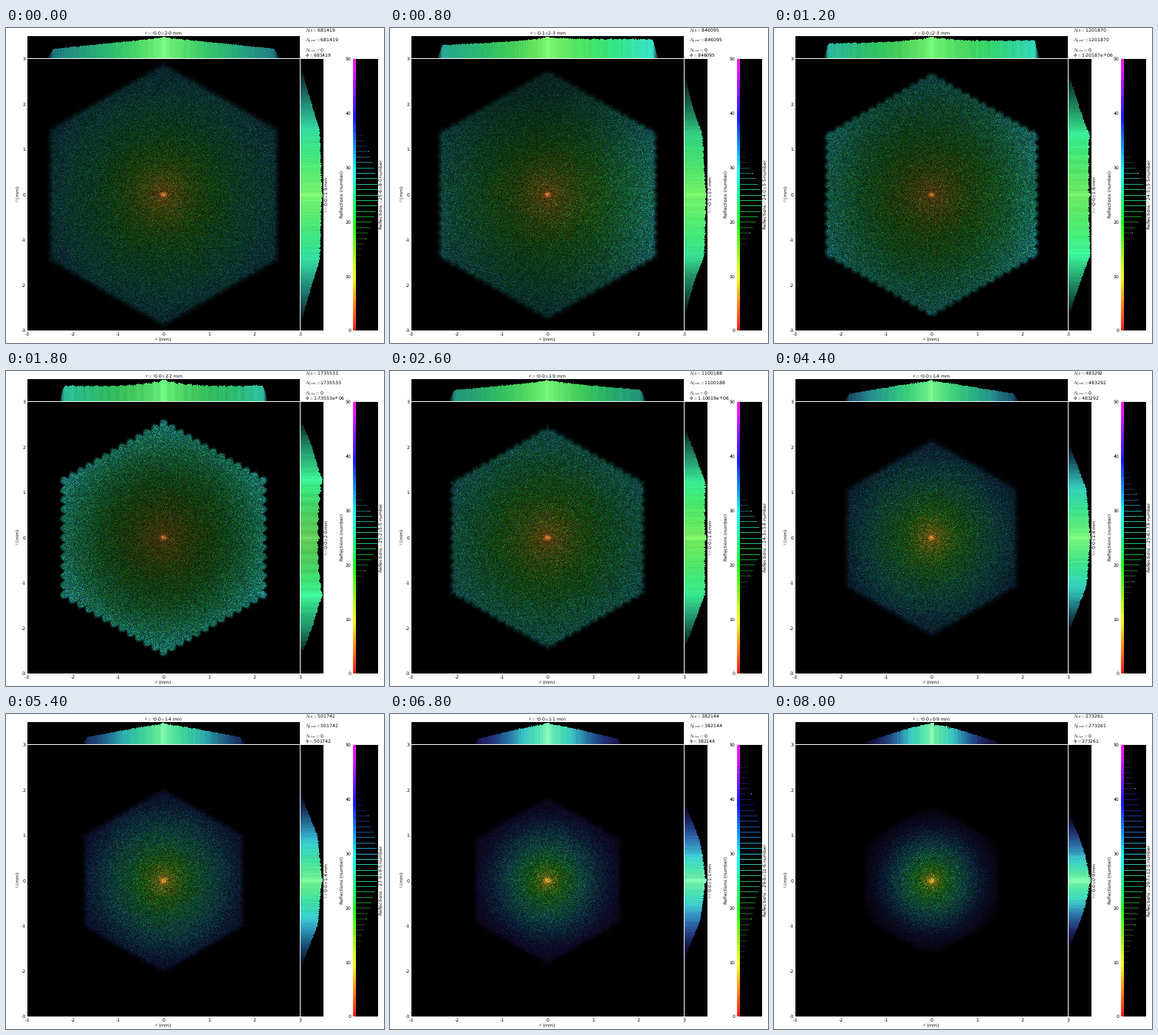
Animation, 512 px wide and 428 px high, one loop 8200 ms. Source, as a matplotlib script:

```python
import numpy as np
import matplotlib.pyplot as plt
from matplotlib.animation import FuncAnimation
from matplotlib.collections import LineCollection
from matplotlib.colors import hsv_to_rgb

W, H, DPI = 512, 428, 64
FRAMES, INTERVAL = 41, 200
SIZE = 369            # main map, pixels per side
STRIP_X, STRIP_Z = 30, 31
MAX_N = 50

plt.rcParams.update({
    'font.family': 'DejaVu Sans',
    'font.size': 6.1 * 72 / DPI,
    'mathtext.fontset': 'cm',
    'axes.unicode_minus': False,
    'text.hinting': 'none',
})

# step: rays, x half width, z half width, mean reflections, their half width
READINGS = {
    0: (681419, 2.0, 1.9, 25.6, 8.0),
    4: (846095, 2.3, 1.7, 24.0, 5.5),
    9: (1735533, 2.2, 2.0, 25.2, 5.5),
    17: (464842, 1.5, 1.3, 23.4, 6.0),
    27: (501742, 1.4, 1.4, 27.9, 9.5),
    34: (382144, 1.1, 1.1, 29.6, 11.6),
    40: (273261, .9, .9, 29.7, 12.5),
}

axis = (np.arange(SIZE) + .5) / SIZE * 6 - 3
X, Z = np.meshgrid(axis, axis)
R = np.hypot(X, Z)
SIDE, SLANT = np.abs(X), .5 * np.abs(X) + .866 * np.abs(Z)
HEX = np.maximum(SIDE, SLANT)
ALONG = np.where(SIDE > SLANT, Z, .866 * np.abs(X) - .5 * np.abs(Z))
SCALLOP = np.abs(np.cos(np.pi * ALONG / .21)) - .5
SPOT = .75 * np.exp(-(X / .058) ** 2 - (Z / .05) ** 2)
HALO = .08 * np.exp(-R / .25)


def pulse(i, centre, width):
    return np.exp(-((i - centre) / width) ** 2)


def readings(i):
    return [np.interp(i, list(READINGS), col) for col in zip(*READINGS.values())]


def colour(n, sat, val):
    hue = .85 * np.clip(n, 0, MAX_N) / MAX_N
    hsv = np.broadcast_arrays(hue, sat, np.clip(val, 0, 1))
    return hsv_to_rgb(np.stack(hsv, -1))


def footprint(i, rng):
    """Beam intensity and its colour map, reflections coded as hue."""
    u = i / (FRAMES - 1)
    rim = pulse(i, 9, 4)       # bright sharp edge near focus
    drift = pulse(i, 4, 2.5)   # short sideways imbalance
    radius = 2.9 - .0375 * i + .0002 * i ** 2
    t = R / radius

    inner = .24 + .1 * u - .07 * rim
    outer = .18 * (1 - u ** 4) + .32 * rim
    body = np.maximum(inner + (outer - inner) * t ** (1.5 + rim), 0)
    body *= 1 + drift * (.08 * X - .04 * Z)
    body *= np.exp(.06 * drift * (X ** 2 - Z ** 2))

    gap = .866 * radius + (.02 + .07 * rim) * SCALLOP - HEX
    mask = np.clip(gap / (.16 - .08 * rim) + .5, 0, 1) ** 1.5
    level = (body + HALO) * mask * rng.gamma(14, 1 / 14, R.shape)
    level += SPOT * rng.uniform(.5, 1.2, R.shape)

    n_edge = 37 - 8 * np.cos(2 * np.pi * (i - 9) / 62)
    spread = 1 + 2 * np.minimum(R / .5, 1)
    n = 2 + (n_edge - 2) * t ** .55 + spread * rng.standard_normal(R.shape)
    return level, colour(n, .77, level)


def profile(level, rgb, along, depth):
    """Filled histogram image, bars growing along the first array axis."""
    height = level.sum(along)
    height = height / height.max()
    bars = rgb.sum(along)
    bars = bars / np.maximum(bars.max(1, keepdims=True), 1e-9)
    bars = bars * height[:, None] ** .85
    rows = (np.arange(depth) + .5)[:, None]
    return bars[None] * (rows < height * (depth - .5))[..., None]


def panel(left, top, right, bottom, xlim, ylim):
    ax = fig.add_axes([left / W, 1 - bottom / H,
                       (right - left) / W, (bottom - top) / H])
    ax.set(xlim=xlim, ylim=ylim, facecolor='black', xticks=[], yticks=[])
    ax.spines[:].set_visible(False)
    ax.tick_params(length=0, pad=3)
    return ax


def picture(ax, shape):
    return ax.imshow(np.zeros(shape + (3,)), origin='lower', aspect='auto',
                     interpolation='nearest',
                     extent=[*ax.get_xlim(), *ax.get_ylim()])


def label(x, y, text='', ha='center', rotation=0):
    return fig.text(x / W, 1 - y / H, text, ha=ha, va='center',
                    rotation=rotation)


fig = plt.figure(figsize=(W / DPI, H / DPI), dpi=DPI, facecolor='white')
span = (-3, 3)
main = panel(29, 42, 398, 411, span, span)
top = panel(29, 11, 398, 41, span, (0, 1))
side = panel(399, 42, 430, 411, (0, 1), span)
bar = panel(470, 42, 474, 411, (0, 1), (0, MAX_N))
counts = panel(474, 42, 504, 411, (0, 1), (0, MAX_N))

main.set_xticks(range(-3, 4))
main.set_yticks(range(-3, 4))
bar.set_yticks(range(0, MAX_N + 1, 10))

map_im = picture(main, (SIZE, SIZE))
top_im = picture(top, (STRIP_X, SIZE))
side_im = picture(side, (SIZE, STRIP_Z))
picture(bar, (SIZE, 1)).set_data(
    colour(np.linspace(0, MAX_N, SIZE), .9, 1)[:, None])

N = np.arange(MAX_N + 1)
lines = LineCollection([], linewidths=72 / DPI, capstyle='butt')
counts.add_collection(lines)
dots, = counts.plot([], [], 's', ms=1.2, mew=0, color='#b8c8b8')

label(213, 423, '$x$ (mm)')
label(16, 226, '$z$ (mm)', rotation=90)
label(456, 226, 'Reflections (number)', rotation=90)
x_text = label(213.5, 6.5)
z_text = label(434, 226.5, rotation=90)
n_text = label(508, 226, rotation=90)
all_text, good_text, over_text, flux_text = (
    label(405, y, ha='left') for y in (3.5, 17, 30.5, 37))
over_text.set_text(r'$N_{\rm over}=$0')


def spread_text(name, mean, half, unit):
    return rf'{name}$=${mean:.1f}$\pm${half:.1f} {unit}'


def update(i):
    rays, x_half, z_half, mean, half = readings(i)
    level, rgb = footprint(i, np.random.default_rng(100 + i))
    map_im.set_data(rgb)
    top_im.set_data(profile(level, rgb, 0, STRIP_X))
    side_im.set_data(profile(level, rgb, 1, STRIP_Z).swapaxes(0, 1))

    height = 2 ** -((N - mean) / half) ** 2
    shown = height > .04
    lines.set_segments([[(0, n), (h, n)]
                        for n, h in zip(N[shown], height[shown])])
    lines.set_color(colour(N, .85, .8 * height)[shown])
    ends = np.array([int(mean - half), int(mean + half)])
    dots.set_data(height[ends], ends)

    drift = .11 * pulse(i, 4, 2) - .01
    x_text.set_text(spread_text('$x$', drift, x_half, 'mm'))
    z_text.set_text(spread_text('$z$', -drift, z_half, 'mm'))
    n_text.set_text(spread_text('Reflections', mean, half, 'number'))
    rays = round(rays)
    all_text.set_text(rf'$N_{{\rm all}}=${rays}')
    good_text.set_text(rf'$N_{{\rm good}}=${rays}')
    flux_text.set_text(rf'$\Phi=${rays:g}')
    return []


anim = FuncAnimation(fig, update, frames=FRAMES, interval=INTERVAL,
                     init_func=lambda: [], repeat=True)
plt.show()
```
